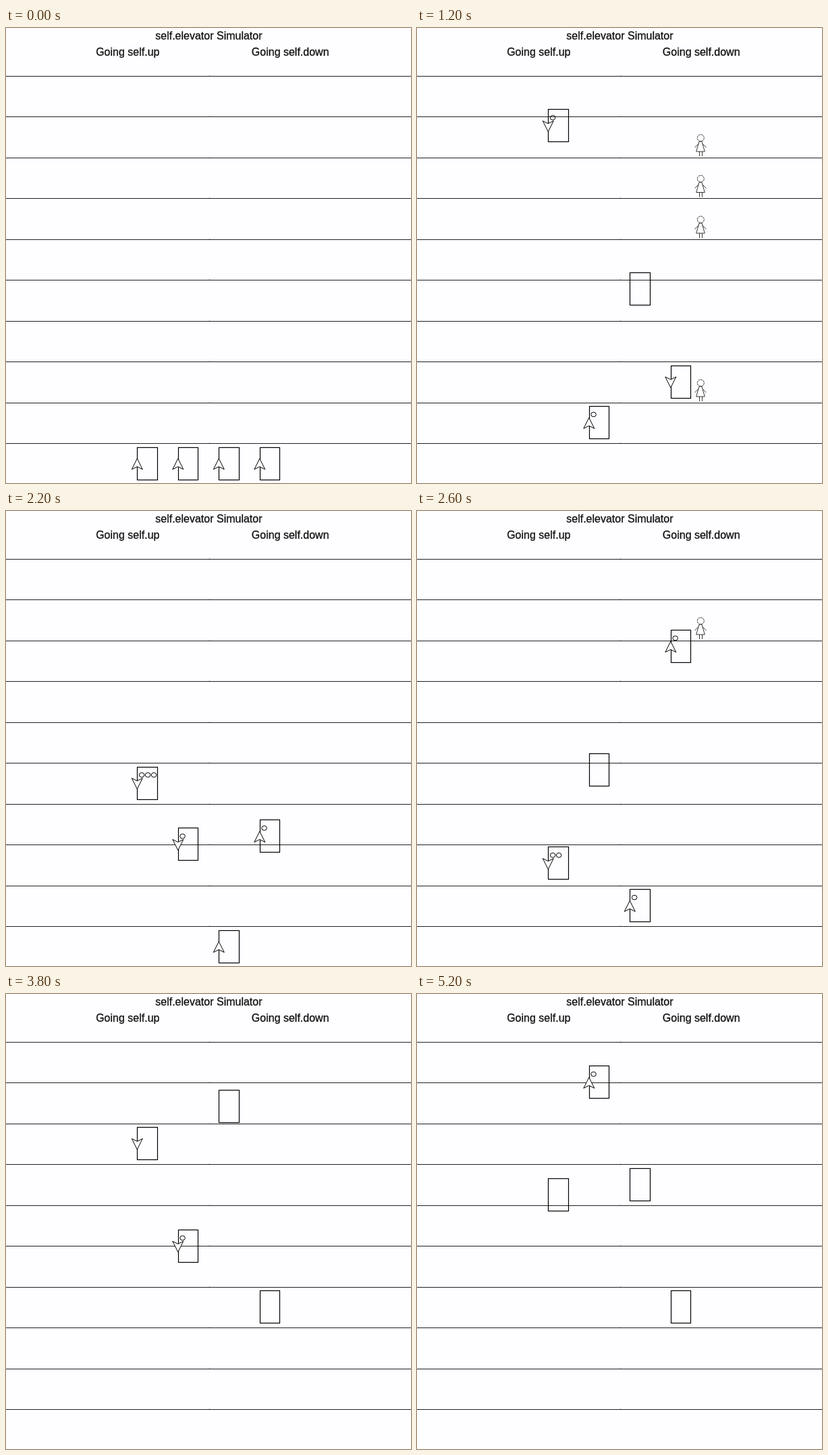
Recreate the animation shown at these times as an HTML page with a canvas. Size 600x674 px, loop 5300 ms.

```html
<!DOCTYPE html>
<html lang="en">
<head>
<meta charset="utf-8">
<title>self.elevator Simulator</title>
<style>
  html, body { margin: 0; width: 100%; height: 100%; overflow: hidden; background: #fefdff; }
  canvas { display: block; }
</style>
</head>
<body>
<canvas id="stage" width="600" height="674"></canvas>
<script>
const ctx = document.getElementById('stage').getContext('2d');
const LOOP = 5300, STEP = 100;
const PAPER = '#fefdff', INK = '#111';
const STOREY = 60.5, GROUND = 621;
const PACE = 86;        // ms per storey
const STOP_PACE = 230;  // ms per storey when halting at each one
const DOOR = 90;        // ms between arriving and people moving
const CAPACITY = 3;

// A trip without riders is a silent repositioning; riders: 0 answers a call empty.
// A full trip halts at every storey. call: when its passenger starts waiting.
const lifts = [
  [
    { leave: 260, to: 9 },
    { leave: 1137, to: 1, riders: CAPACITY, call: 200 },
    { leave: 3200, to: 7 },
    { leave: 3870, to: 3, riders: 0 },
    { leave: 4964, to: 6 }
  ],
  [
    { leave: 950, to: 1 },
    { leave: 1250, to: 5, riders: 1, call: 500 },
    { leave: 1985, to: 2, riders: 1, call: 1350 },
    { leave: 2400, to: 8 },
    { leave: 3350, to: 7 },
    { leave: 3584, to: 0, riders: 1, call: 3200 },
    { leave: 4469, to: 9, riders: 1 }
  ],
  [
    { leave: 832, to: 5 },
    { leave: 1500, to: 0 },
    { leave: 2340, to: 1, riders: 0 },
    { leave: 3098, to: 7.917, riders: 1, call: 2300 },
    { leave: 4350, to: 9 },
    { leave: 4600, to: 6, riders: 1, call: 4300 }
  ],
  [
    { leave: 1000, to: 2 },
    { leave: 1350, to: 0, riders: 1, call: 950 },
    { leave: 1968, to: 8, riders: 1, call: 1500 },
    { leave: 2948, to: 3, riders: 1, call: 2350 }
  ]
].map(linkTrips);

function linkTrips(trips) {
  let from = 0, ready = 0;
  for (const trip of trips) {
    const pace = trip.riders > 1 ? STOP_PACE : PACE;
    const arrive = trip.leave + Math.abs(trip.to - from) * pace;
    Object.assign(trip, { from, ready, pace, arrive, heading: Math.sign(trip.to - from) });
    from = trip.to;
    ready = arrive;
  }
  return trips;
}

const isCalled = trip => trip !== undefined && trip.riders !== undefined;

function storeyAt(trip, t) {
  if (t <= trip.leave) return trip.from;
  if (t >= trip.arrive) return trip.to;
  const elapsed = t - trip.leave;
  const passed = Math.floor(elapsed / trip.pace);
  const part = Math.min(1, elapsed % trip.pace / PACE);
  return trip.from + trip.heading * (passed + part);
}

function ridersAt(trip, t, storey) {
  if (!trip.riders || t < trip.ready + DOOR || t >= trip.arrive + DOOR) return 0;
  if (trip.riders === 1) return 1;
  const level = Math.ceil(storey);
  return Math.min(trip.riders, trip.from + 1 - level, level - trip.to);
}

function liftState(trips, t) {
  const index = trips.findIndex(trip => t < trip.arrive + DOOR);
  const trip = trips[index < 0 ? trips.length - 1 : index];
  const storey = storeyAt(trip, t);
  const riders = ridersAt(trip, t, storey);
  const onDuty = isCalled(trip) && t < trip.arrive + DOOR;
  const next = trips[index + 1];
  let heading = onDuty ? trip.heading : 0;
  if (index >= 0 && t >= trip.arrive && isCalled(next)) heading = next.heading;
  if (t < trips[0].leave) heading = 1;
  return { storey, riders, heading };
}

function trace(points, closed) {
  ctx.beginPath();
  points.forEach(([x, y]) => ctx.lineTo(x, y));
  if (closed) ctx.closePath();
}

function line(...points) {
  trace(points);
  ctx.stroke();
}

function ring(x, y, rx, ry) {
  ctx.beginPath();
  ctx.ellipse(x, y, rx, ry, 0, 0, Math.PI * 2);
  ctx.stroke();
}

function label(text, x, y) {
  ctx.fillText(text, x, y);
  ctx.strokeText(text, x, y);
}

const topOf = storey => GROUND - storey * STOREY;
const snap = v => Math.floor(v) + 0.5;

function drawBuilding() {
  ctx.fillStyle = PAPER;
  ctx.fillRect(0, 0, 600, 674);
  for (let i = 0; i < 10; i++) {
    const y = Math.floor(71.3 + i * STOREY);
    ctx.fillStyle = '#222';
    ctx.fillRect(0, y, 600, 1);
    ctx.fillStyle = '#999';
    ctx.fillRect(301, y - 1, 1, 1);
  }
  ctx.fillStyle = ctx.strokeStyle = INK;
  ctx.lineWidth = 0.3;
  ctx.font = '16px "Liberation Sans", Arial, sans-serif';
  ctx.textAlign = 'center';
  label('self.elevator Simulator', 300.4, 17);
  label('Going self.up', 180.3, 41);
  label('Going self.down', 421.2, 41);
}

function drawPerson(heading, storey) {
  const x = heading > 0 ? 178 : 420, y = topOf(storey);
  ctx.strokeStyle = '#222';
  ctx.lineWidth = 0.9;
  ctx.setLineDash([3, 0.8]);
  ring(x + 0.3, y + 25.8, 5, 5);
  ctx.setLineDash([]);
  trace([[x - 2, y + 31], [x + 2, y + 31], [x + 6.3, y + 46], [x - 6.3, y + 46]], true);
  ctx.stroke();
  for (const side of [-1, 1]) {
    line([x + side * 3, y + 34.5], [x + side * 8.5, y + 40]);
    line([x + 0.5 + side * 2, y + 46], [x + 0.5 + side * 2, y + 53]);
  }
}

function drawWaiting(trip, t) {
  if (!trip.call) return;
  for (let i = 0; i <= trip.riders && (i === 0 || trip.riders > 1); i++) {
    const halt = i ? trip.leave + (i - 1) * trip.pace + PACE : trip.ready;
    const storey = Math.round(trip.from) + i * trip.heading;
    if (t >= trip.call + i * 250 && t < halt + DOOR) drawPerson(trip.heading, storey);
  }
}

function drawLift(trips, column, t) {
  const { storey, riders, heading } = liftState(trips, t);
  const x = 194.6 + column * STOREY, y = topOf(storey);
  const left = snap(x), top = snap(y);
  ctx.strokeStyle = '#000';
  ctx.lineWidth = 1.2;
  ctx.strokeRect(left, top, snap(x + 29.6) - left, 48);

  ctx.lineWidth = 1;
  if (heading) {
    const mid = y + 24.8, tail = mid + 8 * heading;
    const axis = x - 0.3;
    trace([[axis, mid - 8 * heading], [axis + 8, tail],
      [axis, tail - 4 * heading], [axis - 8, tail]], true);
    ctx.fillStyle = PAPER;
    ctx.fill();
    ctx.stroke();
  }
  for (let i = 0; i < riders; i++) ring(x + 6.5 + i * 9, y + 12, 3.8, 3.4);
}

function frame(now) {
  const t = Math.floor(now % LOOP / STEP) * STEP;
  drawBuilding();
  lifts.flat().forEach(trip => drawWaiting(trip, t));
  lifts.forEach((trips, column) => drawLift(trips, column, t));
}

const start = performance.now();
function tick() {
  frame(performance.now() - start);
  requestAnimationFrame(tick);
}
tick();
</script>
</body>
</html>
```
